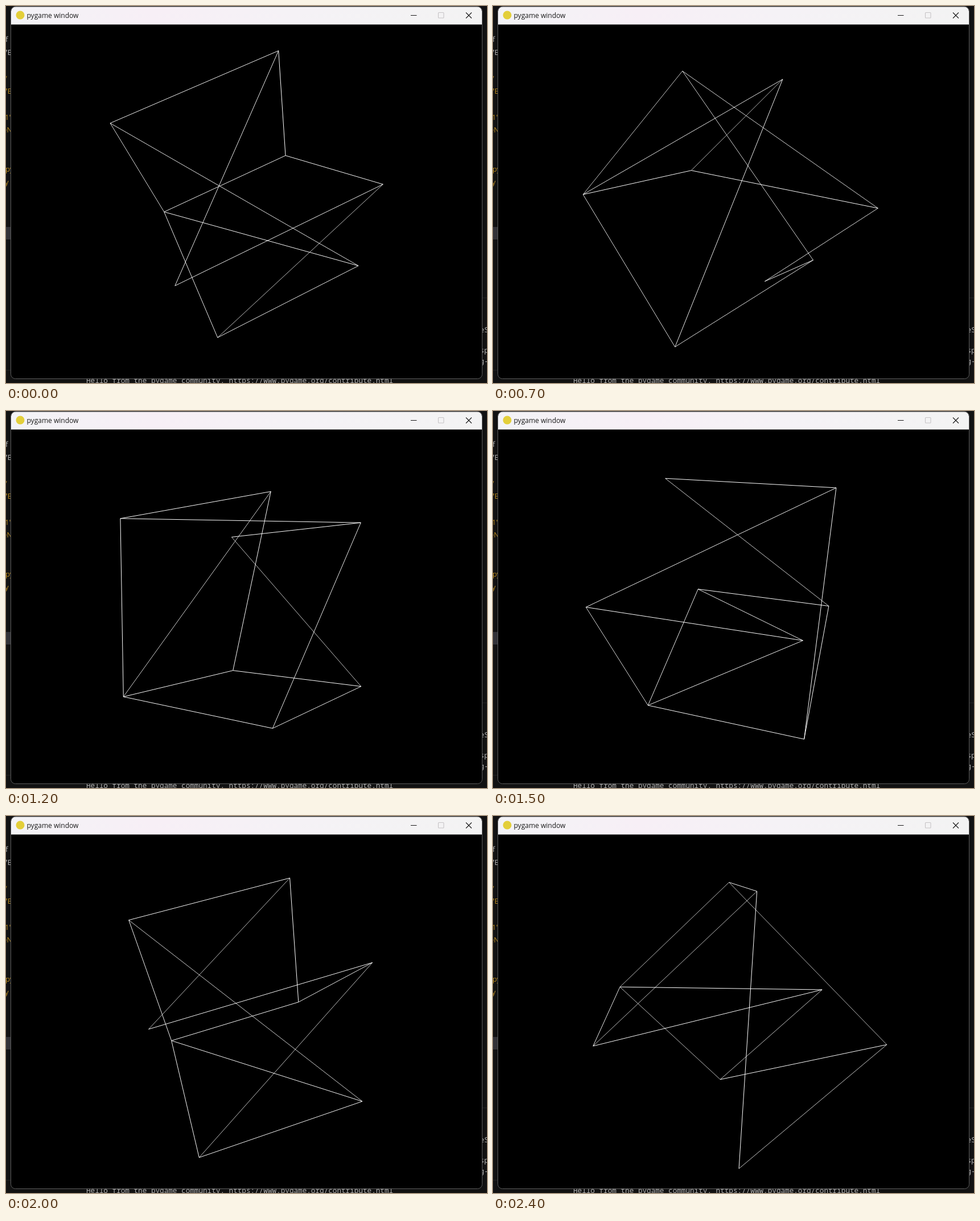
Animation, 845 px wide and 662 px high, one loop 2500 ms. Source, as an HTML page:

```html
<!DOCTYPE html>
<html lang="en">
<head>
<meta charset="utf-8">
<title>pygame window</title>
<style>
  html, body { margin: 0; width: 100%; height: 100%; overflow: hidden; background: #121212; }
  svg { display: block; }
  .ui { font: 12px "Open Sans", "Noto Sans", sans-serif; }
  .side { font: 13px "Open Sans", "Noto Sans", sans-serif; }
  .mono { font: 12.67px "Noto Sans Mono", "DejaVu Sans Mono", monospace; }
</style>
</head>
<body>
<svg width="845" height="662" viewBox="0 0 845 662">
  <defs>
    <linearGradient id="bar">
      <stop offset="0" stop-color="#f3f3f6"/>
      <stop offset=".3" stop-color="#f7eff6"/>
      <stop offset=".6" stop-color="#f5f2f6"/>
      <stop offset="1" stop-color="#f3f3f3"/>
    </linearGradient>
  </defs>

  <!-- editor behind the window -->
  <rect width="845" height="662" fill="#121212"/>
  <rect y="388" width="9" height="22" fill="#333338"/>
  <path d="M837 512.5h8M0 639.5h9" stroke="#222"/>
  <g class="side" fill="#b4b4b4">
    <text x="-1" y="63">f</text>
    <text x="-5" y="86">7E</text>
  </g>
  <g class="side" fill="#b98a1e">
    <text x="-3" y="132">/</text>
    <text x="-5" y="154">7E</text>
    <text x="-2" y="200">1'</text>
    <text x="-6" y="222">eN</text>
    <text x="-1" y="291">py</text>
    <text x="-2" y="314">y</text>
  </g>
  <g class="mono" fill="#b0b0b0">
    <text x="832.5" y="573">eS</text>
    <text x="832.5" y="609">sp</text>
    <text x="832.5" y="628">g-</text>
    <text x="141" y="662">Hello from the pygame community. https://www.pygame.org/contribute.html</text>
  </g>

  <!-- window -->
  <rect x="8.5" y="1" width="828" height="653.5" rx="8" stroke="#5c5c5c"/>
  <path d="M9 32.5V9.5a8 8 0 0 1 8-8H828a8 8 0 0 1 8 8V32.5z" fill="url(#bar)"/>
  <circle cx="25" cy="16" r="7.5" fill="#e3cf3a"/>
  <text class="ui" x="36.5" y="20.5" fill="#1a1a1a">pygame window</text>
  <g fill="none" stroke="#1a1a1a" stroke-width="1.1">
    <path d="M711 16.5h10.5M808 11.5l10 10m0-10l-10 10"/>
    <rect x="759.5" y="11.5" width="9.5" height="9.5" rx="1" stroke="#c6c4c6"/>
  </g>
  <g id="cube" stroke="#fff"></g>
</svg>
<script>
const corners = [
  [1, -1, -1], [1, 1, -1], [-1, 1, -1], [-1, -1, -1],
  [1, -1, 1], [1, 1, 1], [-1, -1, 1], [-1, 1, 1]
];
const edges = ['01', '03', '05', '21', '23', '24', '63', '64', '65', '71', '75', '34'];
const axis = [3, 1, 1].map(v => v / Math.sqrt(11));
const center = [422.5, 343.3];
const focal = 310.5 / Math.tan(Math.PI / 8); // 45 degree field of view
const distance = 5;

const cube = document.getElementById('cube');
const lines = edges.map(() =>
  cube.appendChild(document.createElementNS('http://www.w3.org/2000/svg', 'path')));

// [step, degrees turned]: the spin speeds up slightly
const turns = [[0, 64], [3, 114], [7, 181], [12, 266], [18, 369], [20, 404], [24, 477]];

function degreesAt(step) {
  const i = Math.max(1, turns.findIndex(([s]) => s >= step));
  const [s0, d0] = turns[i - 1], [s1, d1] = turns[i];
  return Math.round(d0 + (d1 - d0) * (step - s0) / (s1 - s0));
}

function project([x, y, z], angle) {
  const [a, b, c] = axis, cos = Math.cos(angle), sin = Math.sin(angle);
  const along = (a * x + b * y + c * z) * (1 - cos);
  const px = x * cos + (b * z - c * y) * sin + a * along;
  const py = y * cos + (c * x - a * z) * sin + b * along;
  const pz = z * cos + (a * y - b * x) * sin + c * along;
  const scale = focal / (distance - pz);
  return [center[0] + px * scale, center[1] - py * scale];
}

function draw(ms) {
  const angle = degreesAt(Math.floor(ms % 2500 / 100)) * Math.PI / 180;
  const points = corners.map(v => project(v, angle));
  edges.forEach(([i, j], n) => {
    const [x0, y0] = points[i], [x1, y1] = points[j];
    const dx = Math.abs(x1 - x0), dy = Math.abs(y1 - y0);
    lines[n].setAttribute('d', `M${x0} ${y0}L${x1} ${y1}`);
    // a raster line lights one pixel per step, so diagonals look thinner
    lines[n].setAttribute('stroke-width', Math.max(dx, dy) / Math.hypot(dx, dy));
  });
}

const start = performance.now();
function tick() {
  draw(performance.now() - start);
  requestAnimationFrame(tick);
}
tick();
</script>
</body>
</html>
```
